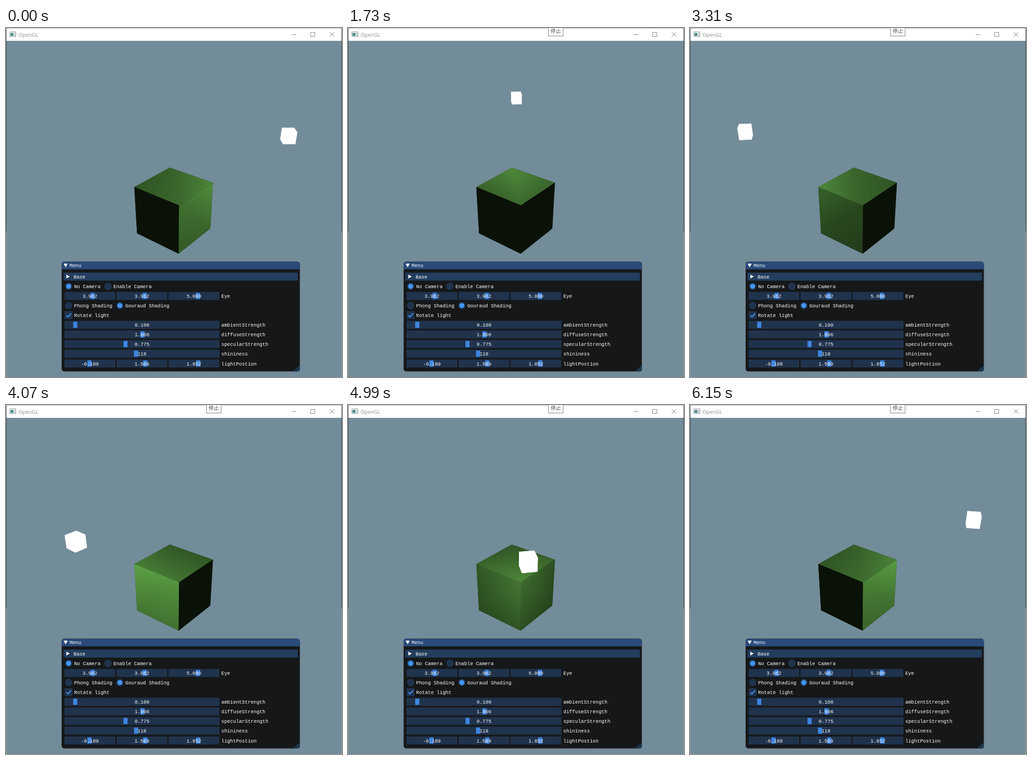
Recreate the animation shown at these times as an HTML page with a canvas. Size 735 by 762 pixels, loop 6.2 s.

```html
<!DOCTYPE html>
<html lang="en">
<head>
<meta charset="utf-8">
<title>OpenGL</title>
<style>
  html, body { margin: 0; width: 100%; height: 100%; overflow: hidden; background: #738c99; }
  canvas, svg { position: absolute; left: 0; top: 0; }
  .ui text { font: 10.72px "Liberation Mono", monospace; fill: #fff; }
  .frame { fill: #20334d; }
  .grab { fill: #3d85e0; }
  .mark { fill: #4296fa; }
  .thin { fill: none; stroke: #7a7a7a; }
</style>
</head>
<body>
<canvas id="scene" width="735" height="762"></canvas>
<svg width="735" height="762">
  <rect width="735" height="28" fill="#fff"/>
  <path d="M0 .5H735" stroke="#a5a9ab"/>
  <path d="M.5 1V444M734.5 1V444" stroke="#3c4246"/>
  <path d="M.5 444V762M734.5 444V762" stroke="#93a3ab"/>
  <rect x="8.5" y="8.5" width="13" height="10" fill="#f4f6f6" stroke="#7d8589"/>
  <rect x="10" y="11" width="6" height="6" fill="#3d8a84"/>
  <rect x="17" y="11" width="3" height="6" fill="#c3cacc"/>
  <text x="27.5" y="18.5" font-family="'Open Sans', sans-serif" font-size="11.3" fill="#8c8c8c">OpenGL</text>
  <path class="thin" d="M625 14.5H635M666.5 9.5H675.5V18.5H666.5ZM708 9L718 19M718 9L708 19"/>
  <g id="tip">
    <rect x="438.5" y="-4.5" width="32" height="22" fill="#fff" stroke="#767676"/>
    <text x="443" y="10.5" font-family="'Noto Sans CJK SC', 'Noto Sans CJK', sans-serif" font-size="11.5" fill="#505050">停止</text>
  </g>
  <g class="ui" id="menu">
    <rect x="121.5" y="510" width="521.5" height="240" rx="6" fill="#151718" stroke="#5f6775"/>
    <path d="M122 527V516Q122 510.5 127.5 510.5H637Q642.5 510.5 642.5 516V527Z" fill="#294a7a"/>
    <path d="M126 514.5H135L130.5 522.5ZM132 538.5V547L139.5 542.7Z" fill="#fff"/>
    <path d="M643 736V745Q643 750 638 750H628Z" fill="#203750"/>
  </g>
</svg>
<script>
// ---- Menu panel ----
const menu = document.getElementById('menu');
const tip = document.getElementById('tip');
const add = markup => menu.insertAdjacentHTML('beforeend', markup);
const label = (x, y, text, anchor = 'start') =>
  add(`<text x="${x}" y="${y + 4}" text-anchor="${anchor}">${text}</text>`);
const box = (x, y, w, h, cls) =>
  add(`<rect class="${cls}" x="${x}" y="${y - h / 2}" width="${w}" height="${h}"/>`);

function slider(x, y, w, grab, value) {
  box(x, y, w, 17.5, 'frame');
  box(grab, y, 9, 13.5, 'grab');
  label(x + w / 2, y, value, 'middle');
}
function radio(x, y, text, on) {
  add(`<circle class="frame" cx="${x}" cy="${y}" r="8.2"/>`);
  if (on) add(`<circle class="mark" cx="${x}" cy="${y}" r="5.5"/>`);
  label(x + 12, y, text);
}
function triple(y, name, grabs, values) {
  [128, 241.8, 355.5].forEach((x, i) => slider(x, y, 111, grabs[i], values[i]));
  label(471, y, name);
}

label(139, 518, 'Menu');
menu.insertBefore(document.createElementNS('http://www.w3.org/2000/svg', 'rect'), menu.children[2]);
const header = menu.children[2];
Object.entries({ x: 125.5, y: 534, width: 513, height: 17.5, fill: '#233e5e' })
  .forEach(([key, value]) => header.setAttribute(key, value));
label(148, 543, 'Base');
radio(137, 564, 'No Camera', true);
radio(223, 564, 'Enable Camera');
triple(585, 'Eye', [185, 299, 415], ['3.962', '3.962', '5.000']);
radio(137, 606, 'Phong Shading');
radio(249, 606, 'Gouraud Shading', true);
box(128, 627, 17.5, 17.5, 'frame');
add('<path d="M132 627.5L135.5 631L142.5 623" fill="none" stroke="#4296fa" stroke-width="2"/>');
label(149, 627, 'Rotate light');
[
  ['ambientStrength', 147, '0.100'],
  ['diffuseStrength', 294, '1.006'],
  ['specularStrength', 257, '0.775'],
  ['shininess', 280, '118']
].forEach(([name, grab, value], i) => {
  slider(128, 648 + 21 * i, 339, grab, value);
  label(471, 648 + 21 * i, name);
});
triple(732.5, 'lightPostion', [178, 300, 416], ['-0.189', '1.509', '1.852']);

// ---- Vector helpers and camera ----
const dot = (a, b) => a[0] * b[0] + a[1] * b[1] + a[2] * b[2];
const sub = (a, b) => a.map((v, i) => v - b[i]);
const unit = a => a.map(v => v / Math.hypot(...a));
const cross = (a, b) => [a[1] * b[2] - a[2] * b[1], a[2] * b[0] - a[0] * b[2], a[0] * b[1] - a[1] * b[0]];

const eye = [3.962, 3.962, 5];
const back = unit(eye), right = unit(cross([0, 1, 0], back)), up = cross(back, right);
const focal = 367 / Math.tan(Math.PI / 8);

function project(p) {
  const scale = focal / (Math.hypot(...eye) - dot(p, back));
  return [367.5 + dot(p, right) * scale, 394.5 - dot(p, up) * scale];
}

// ---- Scene ----
const ctx = document.getElementById('scene').getContext('2d');
const H = 0.5;
// Corners run around each face; the first and third lie on the triangle split.
const faces = [
  { normal: [0, 1, 0], corners: [[-H, H, -H], [H, H, -H], [H, H, H], [-H, H, H]] },
  { normal: [1, 0, 0], corners: [[H, H, H], [H, H, -H], [H, -H, -H], [H, -H, H]] },
  { normal: [0, 0, 1], corners: [[-H, -H, H], [H, -H, H], [H, H, H], [-H, H, H]] }
];
const outline = [[-H, H, -H], [H, H, -H], [H, -H, -H], [H, -H, H], [-H, -H, H], [-H, H, H]].map(project);
const green = s => `rgb(${[0.4, 0.7, 0.3].map(c => Math.round(255 * Math.min(1, c * s)))})`;

function fill(points, style) {
  ctx.beginPath();
  points.forEach(p => ctx.lineTo(...p));
  ctx.fillStyle = style;
  ctx.fill();
}

// Ambient, diffuse and specular light at one vertex.
function shade(p, normal, light) {
  const l = unit(sub(light, p)), d = dot(normal, l);
  const reflected = normal.map((n, i) => 2 * d * n - l[i]);
  const spec = Math.max(0, dot(reflected, unit(sub(eye, p)))) ** 118;
  return 0.1 + 1.006 * Math.max(0, d) + (d > 0 ? 0.775 * spec : 0);
}

// Linear gradient that blends three vertex shades across a triangle.
function blend([a, b, c], [sa, sb, sc]) {
  const [ux, uy] = [b[0] - a[0], b[1] - a[1]], [vx, vy] = [c[0] - a[0], c[1] - a[1]];
  const det = ux * vy - uy * vx;
  const gx = ((sb - sa) * vy - (sc - sa) * uy) / det;
  const gy = ((sc - sa) * ux - (sb - sa) * vx) / det;
  const len = gx * gx + gy * gy;
  if (len < 1e-12) return green(sa);
  const low = Math.min(sa, sb, sc), high = Math.max(sa, sb, sc);
  const at = s => [a[0] + gx * (s - sa) / len, a[1] + gy * (s - sa) / len];
  const gradient = ctx.createLinearGradient(...at(low), ...at(high));
  gradient.addColorStop(0, green(low));
  gradient.addColorStop(1, green(high));
  return gradient;
}

function draw(clock) {
  const turn = 3.914 + 1.006 * (clock / 1000 - 1.735);
  const sin = Math.sin(turn), cos = Math.cos(turn);
  const rotate = ([x, y, z]) => [x * cos + z * sin, y, z * cos - x * sin];
  const lightPos = [-0.189, 1.509, 1.852], light = rotate(lightPos);

  ctx.fillStyle = '#738c99';
  ctx.fillRect(0, 0, 735, 762);
  fill(outline, green(0.1));
  for (const { normal, corners } of faces) {
    const p = corners.map(project), s = corners.map(c => shade(c, normal, light));
    fill(p, blend([p[0], p[1], p[2]], [s[0], s[1], s[2]]));
    const half = [p[0], p[2], p[3]];
    fill(half, blend(half, [s[0], s[2], s[3]]));
  }
  // The lamp is a small cube turning with its orbit.
  for (const { corners } of faces)
    for (const side of [1, -1])
      fill(corners.map(c => project(rotate(c.map((v, i) => lightPos[i] + v * 0.2 * side)))), '#fff');
}

// ---- Timing: runs of even steps [start, end, poses], each last pose held until the next run ----
const runs = [
  [100, 660, 11], [760, 760, 1], [800, 1370, 11], [1450, 1680, 5], [1730, 2060, 7],
  [2160, 2750, 12], [2850, 3260, 8], [3310, 3440, 4], [3540, 4150, 12], [4250, 4580, 7],
  [4630, 4840, 5], [4940, 5360, 8], [5410, 5560, 4], [5640, 6150, 10]
];
function stepped(t) {
  const run = runs.findLast(r => r[0] <= t);
  if (!run) return 63;
  const [start, end, count] = run;
  const step = (end - start) / (count - 1) || 1;
  return Math.min(end, start + Math.floor((t - start) / step + 1e-6) * step);
}

const began = performance.now();
function tick() {
  const t = (performance.now() - began) % 6200;
  tip.style.display = t < 100 ? 'none' : '';
  draw(stepped(t));
  requestAnimationFrame(tick);
}
tick();
</script>
</body>
</html>
```
